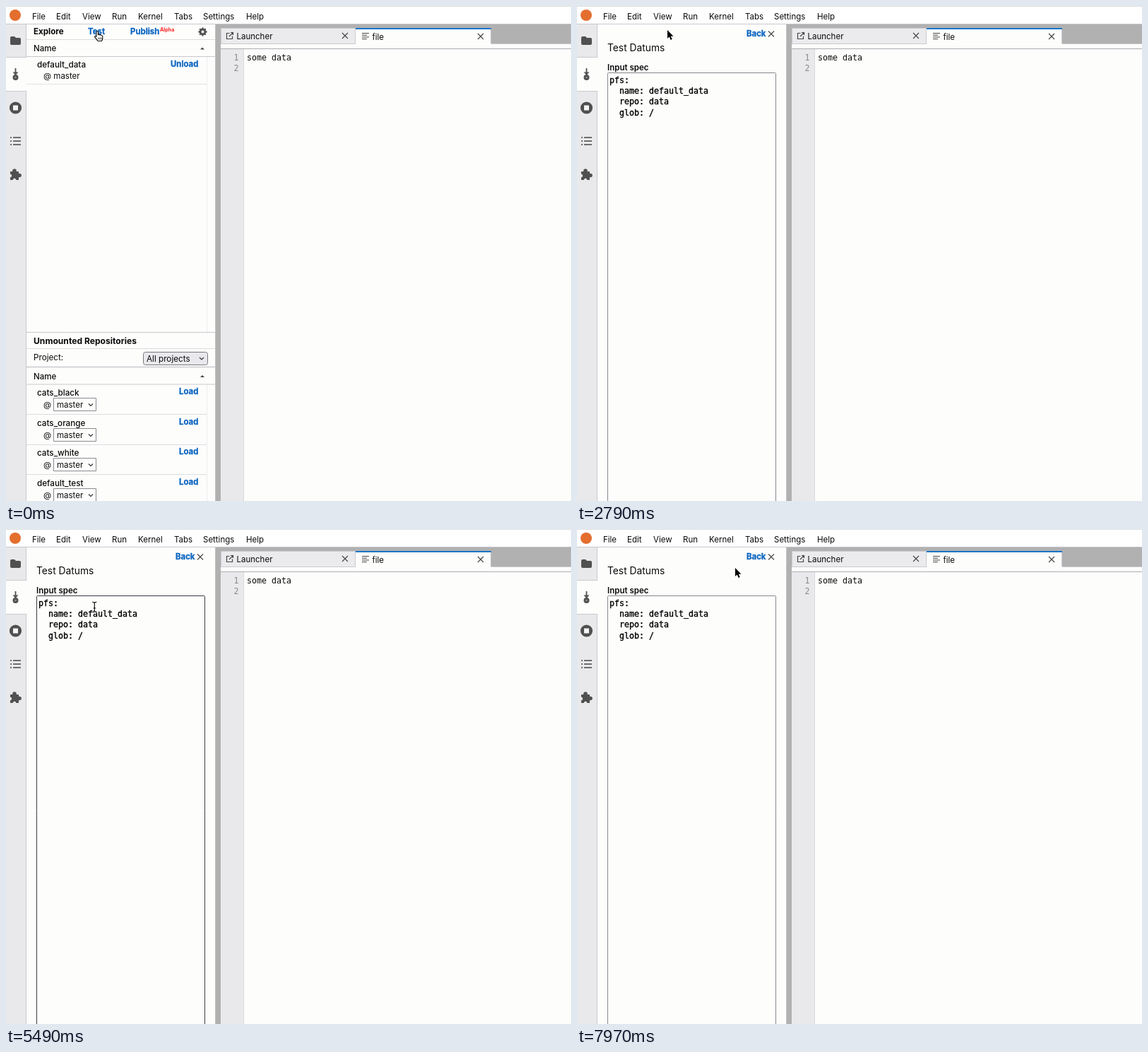
Recreate the animation shown at these times as an HTML page with a canvas. Size 800x700 px, loop 7990 ms.

```html
<!DOCTYPE html>
<html lang="en">
<head>
<meta charset="utf-8">
<title>Test datums</title>
<style>
html, body { margin: 0; width: 100%; height: 100%; overflow: hidden; background: #fdfdfd; }
canvas { display: block; width: 800px; height: 700px; }
</style>
</head>
<body>
<canvas id="stage"></canvas>
<script>
const LOOP = 7990;
const OPEN_AT = 1150; // the test panel replaces the list
const canvas = document.getElementById('stage');
const ratio = window.devicePixelRatio || 1;
canvas.width = 800 * ratio;
canvas.height = 700 * ratio;
const ctx = canvas.getContext('2d');

const SANS = 'Inter, "Liberation Sans", sans-serif';
const MONO = '"DejaVu Sans Mono", monospace';
const INK = '#0a0a0a', BLUE = '#0f67c0', PAPER = '#fdfdfc', RAIL = '#e9e9eb';
const LINE = '#c9c9cf', GREY = '#b1b1b1', ICON = '#505050';

// Pointer stops: time, x, y
const STOPS = [
  [0, 128, 34], [3400, 128, 34], [3770, 142, 58], [4250, 133, 86], [4790, 121, 95],
  [5400, 124, 108], [6100, 134, 126], [6570, 136, 123], [6800, 144, 119],
  [7450, 204, 76], [7850, 224, 55], [LOOP, 224, 55]
];

function rect(x, y, w, h, fill) {
  ctx.fillStyle = fill;
  ctx.fillRect(x, y, w, h);
}

function frame(x, y, w, h, stroke, fill, r = 0) {
  ctx.beginPath();
  ctx.roundRect(x + .5, y + .5, w - 1, h - 1, r);
  if (fill) { ctx.fillStyle = fill; ctx.fill(); }
  ctx.strokeStyle = stroke;
  ctx.lineWidth = 1;
  ctx.stroke();
}

function text(s, x, y, { size = 11.5, weight = 400, color = INK, font = SANS, thicken = 0 } = {}) {
  ctx.font = `${weight} ${size}px ${font}`;
  ctx.fillStyle = color;
  ctx.fillText(s, x, y);
  if (!thicken) return;
  ctx.strokeStyle = color;
  ctx.lineWidth = thicken;
  ctx.strokeText(s, x, y);
}

const bold = (s, x, y, color = INK, size = 11.4) => text(s, x, y, { weight: 700, color, size });
const link = (s, x, y) => text(s, x, y, { weight: 700, color: BLUE, size: 11.4, thicken: .3 });
const label = (s, x, y) => text(s, x, y, { weight: 500, size: 11.7 });
const mono = (s, x, y, color = INK, thicken = 0) =>
  text(s, x, y, { size: 11.63, color, font: MONO, thicken });

function stroke(path, color, width = 1) {
  ctx.strokeStyle = color;
  ctx.lineWidth = width;
  ctx.stroke(new Path2D(path));
}

function shape(path, color) {
  ctx.fillStyle = color;
  ctx.fill(new Path2D(path));
}

function dot(x, y, r, color) {
  ctx.fillStyle = color;
  ctx.beginPath();
  ctx.arc(x, y, r, 0, Math.PI * 2);
  ctx.fill();
}

const cross = (x, y) => stroke(`M${x - 4} ${y - 4}l8 8m0 -8l-8 8`, '#444', 1.1);
const chevron = (x, y) => stroke(`M${x - 3} ${y - 1.5}l3 3l3 -3`, '#333', 1.2);
const sortMark = (x, y) => shape(`M${x - 3} ${y + 1.5}l3 -3l3 3z`, '#444');

function drawMenu() {
  rect(0, 0, 800, 25, '#fff');
  rect(0, 0, 800, 1, '#dededf');
  rect(0, 25, 800, 1, LINE);
  dot(13, 13, 8, '#e46e2e');
  [['File', 37], ['Edit', 71], ['View', 108], ['Run', 150], ['Kernel', 187],
   ['Tabs', 238], ['Settings', 279], ['Help', 340]]
    .forEach(([s, x]) => text(s, x, 19));
}

function drawRail() {
  rect(0, 26, 28, 674, RAIL);
  rect(28, 26, 1, 674, LINE);
  rect(0, 73, 29, 47, PAPER);
  rect(0, 72, 28, 1, LINE);
  rect(0, 120, 28, 1, LINE);
  shape('M6 45q0 -2 2 -2h4l2 2h5q2 0 2 2v6q0 2 -2 2h-11q-2 0 -2 -2z', ICON);
  stroke('M13.5 88v7', ICON, 1.8);
  shape('M9.5 93.5h8l-4 4.5z', ICON);
  dot(13.5, 101, 4, ICON);
  dot(13.5, 101, 1.2, '#999');
  dot(13.5, 144, 8.6, ICON);
  rect(10, 140.5, 7, 7, '#f5f5f5');
  for (let y = 186; y <= 196; y += 5) {
    rect(6, y - .8, 2, 1.6, ICON);
    rect(10, y - .8, 11, 1.6, ICON);
  }
  rect(6, 234, 12, 12, ICON);
  dot(12, 233, 2.8, ICON);
  dot(19, 239.5, 2.8, ICON);
  dot(12, 246, 2.2, RAIL);
  dot(6, 240, 2.2, RAIL);
}

function drawEditor() {
  rect(297, 26, 503, 27, GREY);
  rect(297, 26, 7, 674, GREY);
  rect(296, 26, 1, 674, '#c4c4c8');
  rect(304, 53, 496, 647, PAPER);
  rect(304, 53, 496, 1, LINE);
  frame(304, 31, 191, 23, LINE, '#ebebed');
  rect(495, 31, 192, 24, PAPER);
  rect(495, 31, 192, 2, '#1976c9');
  rect(686, 33, 1, 20, LINE);
  stroke('M316.5 38.5h-4v8h8v-4M318 37.5h3.5v3.5M316 43l5 -5', '#444', 1.2);
  text('Launcher', 326.5, 46.5);
  cross(480, 42);
  [[38, 10], [40.7, 7], [43.4, 10], [46.1, 7]].forEach(([y, w]) => rect(504, y, w, 1.1, '#555'));
  text('file', 518.5, 47.5);
  cross(672, 43);
  rect(304, 60, 496, 1, '#adadb1');
  rect(304, 61, 32, 639, RAIL);
  rect(336, 61, 1, 639, '#d9d9dc');
  mono('1', 322.5, 77, '#8a8a8a');
  mono('2', 322.5, 92, '#8a8a8a');
  mono('some data', 341, 77);
}

function gear(x, y) {
  stroke(Array.from({ length: 8 }, (_, i) => {
    const a = i * Math.PI / 4;
    return `M${x} ${y}l${6 * Math.cos(a)} ${6 * Math.sin(a)}`;
  }).join(''), ICON, 2.4);
  dot(x, y, 4.7, ICON);
  dot(x, y, 1.9, PAPER);
}

function nameHeader(y) {
  text('Name', 39, y, { weight: 500 });
  sortMark(278, y - 4);
  rect(29, y + 7, 267, 1, LINE);
}

function drawList() {
  bold('Explore', 39, 40, INK, 11.6);
  link('Test', 116, 40);
  link('Publish', 176, 40);
  bold('Alpha', 218, 36, '#f22', 7.2);
  gear(278.5, 36.5);
  rect(29, 47, 267, 1, '#dcdce0');
  nameHeader(64);
  label('default_data', 44, 87);
  text('@ master', 53, 103);
  link('Unload', 233, 86);
  rect(29, 110, 255, 1, '#e2e2e4');
  rect(284, 72, 1, 389, '#ededee');

  rect(29, 461, 267, 1, LINE);
  bold('Unmounted Repositories', 39, 478, INK, 12.1);
  rect(29, 484, 267, 1, '#dcdce0');
  text('Project:', 39, 501, { size: 11.7 });
  frame(194, 489, 92, 19, '#77777c', '#e9e9ed', 3);
  text('All projects', 199, 502.5, { size: 11.7 });
  chevron(277, 498.5);
  rect(29, 510, 267, 1, '#b9b9bf');
  nameHeader(527.5);
  rect(284, 536, 1, 164, '#ededee');
  ['cats_black', 'cats_orange', 'cats_white', 'default_test'].forEach((name, i) => {
    const y = Math.round(535 + i * 42.7);
    label(name, 44, y + 16);
    text('@', 53, y + 33);
    frame(67, y + 19, 61, 19, '#8a8a90', PAPER);
    text('master', 72, y + 33);
    chevron(120, y + 29);
    link('Load', 245, y + 14);
    rect(29, y + 42, 255, 1, '#dcdce0');
  });
}

function drawTest(hover) {
  link('Back', 240, 43);
  cross(275, 39.5);
  text('Test Datums', 43, 63.5, { size: 13.8 });
  text('Input spec', 43, 90.5, { weight: 600 });
  frame(43, 94, 239, 620, hover ? '#3c3c40' : '#88888e', PAPER, 1);
  ['pfs:', '  name: default_data', '  repo: data', '  glob: /']
    .forEach((s, i) => mono(s, 46, 109 + i * 15.2, '#000', .35));
}

function pointerAt(t) {
  const i = Math.max(1, STOPS.findIndex(s => s[0] >= t));
  const [a, b] = [STOPS[i - 1], STOPS[i]];
  const k = (t - a[0]) / (b[0] - a[0]);
  return [a[1] + (b[1] - a[1]) * k, a[2] + (b[2] - a[2]) * k];
}

function drawPointer(x, y, kind) {
  ctx.save();
  ctx.translate(x, y);
  ctx.lineJoin = 'round';
  if (kind === 'text') {
    const beam = 'M-3 -7q3 0 3 2v10q0 2 -3 2M3 -7q-3 0 -3 2M3 7q-3 0 -3 -2M-1.5 1.5h3';
    stroke(beam, '#fff', 2.6);
    stroke(beam, '#111', 1.2);
  } else if (kind === 'hand') {
    const hand = 'M0 3q0 -1.5 1.2 -1.5t1.3 1.5v4q.2 -1 1.3 -.8t1.1 1q.3 -.7 1.2 -.5t1 1.1q1.6 -.5 1.7 1.2v2.5q0 2 -1.3 4h-5.5q-1.5 -2.5 -4 -5q-1 -1.5 .3 -2t1.7 1z';
    shape(hand, '#fff');
    stroke(hand, '#111', 1.1);
    stroke('M3 10.5v3M5 10.5v3M7 10.5v3', '#111', .8);
  } else {
    const arrow = 'M0 0v12l2.7 -2.5l2 4.5l2 -.9l-2 -4.4h3.8z';
    stroke(arrow, '#fff', 2);
    shape(arrow, '#000');
  }
  ctx.restore();
}

function draw(t) {
  ctx.setTransform(ratio, 0, 0, ratio, 0, 0);
  rect(0, 0, 800, 700, PAPER);
  drawMenu();
  drawRail();
  drawEditor();
  const [x, y] = pointerAt(t);
  const open = t >= OPEN_AT;
  const hover = open && y >= 94;
  if (open) drawTest(hover); else drawList();
  drawPointer(x, y, hover ? 'text' : open ? 'arrow' : 'hand');
}

function tick(now) {
  draw(now % LOOP);
  requestAnimationFrame(tick);
}
requestAnimationFrame(tick);
</script>
</body>
</html>
```
